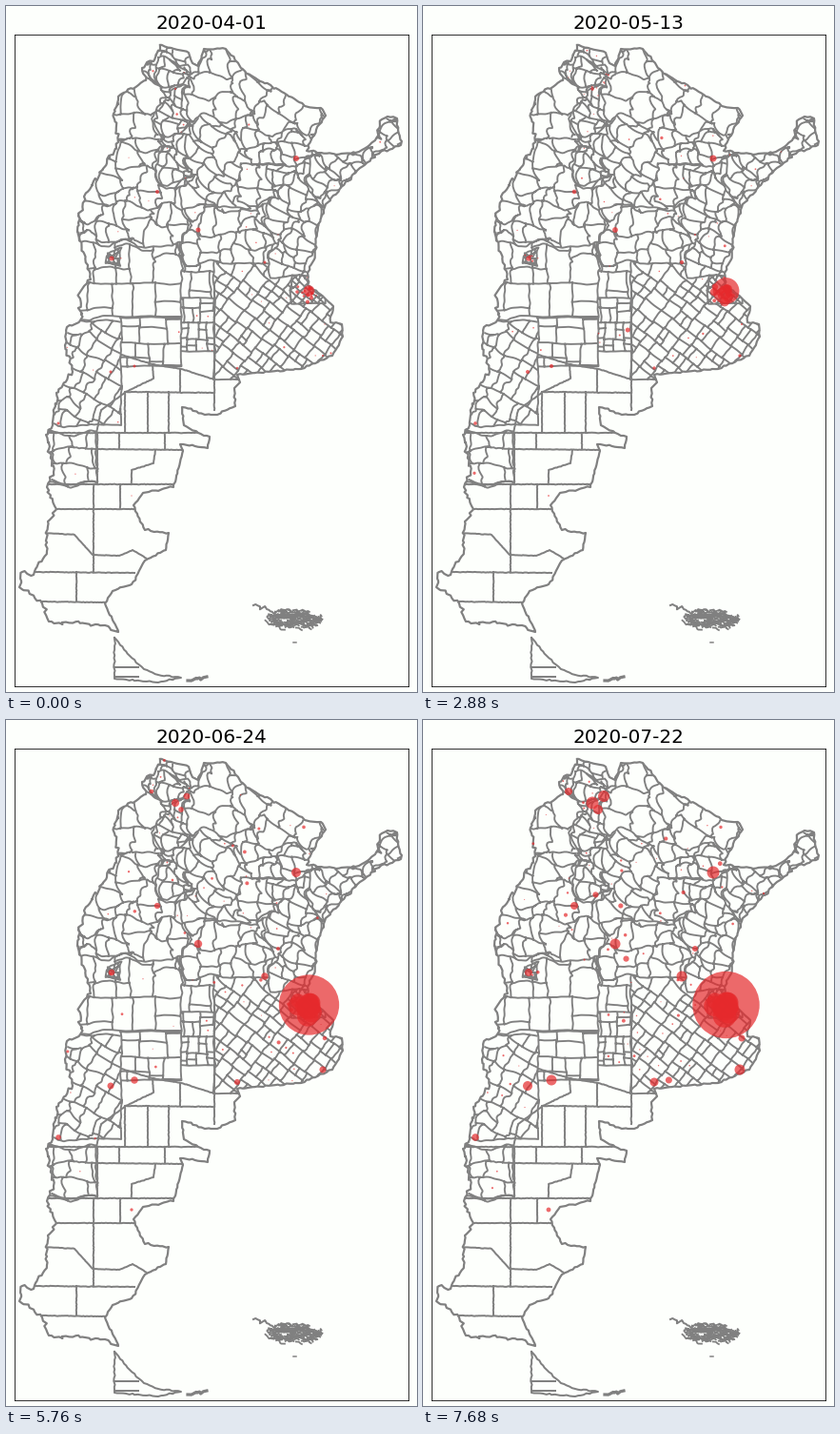
Animation of 432x720 px, one loop 8000 ms. Source, as a matplotlib script:

```python
import numpy as np
import matplotlib.pyplot as plt
from matplotlib.animation import FuncAnimation
from matplotlib.path import Path

W, H, DPI = 432, 720, 72
PAPER, GREY, RED = "#fdfffc", "#808080", "#e6292c"
FRAMES, INTERVAL, FRAMES_PER_WEEK, WEEKS = 50, 160, 3, 17
GAP = [[np.nan, np.nan]]
rng = np.random.default_rng(7)

# Data units are pixels, counted from the top left corner.
fig = plt.figure(figsize=(W / DPI, H / DPI), dpi=DPI, facecolor=PAPER)
ax = fig.add_axes([9 / W, 6 / H, 414 / W, 684 / H], facecolor=PAPER)
ax.set(xlim=(9, 423), ylim=(714, 30), xticks=[], yticks=[])
title = ax.set_title("", fontsize=20, family="DejaVu Sans", pad=6)


def trace(points, jitter=0.0, step=1.5):
    """Subdivide a polyline and shake the added points."""
    points = np.reshape(points, (-1, 2)).astype(float)
    out = []
    for a, b in zip(points[:-1], points[1:]):
        n = max(1, int(np.hypot(*(b - a)) / step))
        part = a + (b - a) * np.arange(n)[:, None] / n
        part[1:] += rng.normal(0, 1, (n - 1, 2)) * jitter
        out.append(part)
    return np.vstack(out + [points[-1:]])


def stroke(points, width=2):
    ax.plot(*points.T, color=GREY, lw=width, solid_joinstyle="round", zorder=2)


def fade(v):
    return 1 / (1 + np.exp(np.clip(v, -50, 50)))


# Districts share one field of waves, so warped lines still meet.
wavelength = np.array([38, 30, 17, 13, 9, 7])
bearing = rng.uniform(0, 2 * np.pi, 6)
wave = 2 * np.pi / wavelength * np.array([np.cos(bearing), np.sin(bearing)])
phase = rng.uniform(0, 2 * np.pi, (6, 2))


def warp(p):
    """Bend lines strongly in the north and west, hardly in the plains."""
    x, y = p.T
    strength = 0.2 + 0.9 * fade((y - 265) / 12) + 0.6 * fade((x - 95) / 8) * fade((300 - y) / 9)
    shift = np.sin((p @ wave)[:, :, None] + phase) * 0.065 * wavelength[:, None]
    return p + shift.sum(1) * strength[:, None]


# Outer border, clockwise from the northern tip.
rivers = [162, 41, 192, 49, 196, 60, 202, 63, 208, 45, 231, 45, 253, 71, 287, 88,
          314, 105, 331, 107, 336, 115, 326, 130, 316, 152, 347, 156, 371, 153,
          388, 141, 395, 119, 401, 116, 411, 118, 415, 146, 392, 155, 372, 170,
          336, 208, 328, 232, 324, 266, 317, 280, 317, 293]
atlantic = [317, 293, 331, 303, 344, 315, 341, 332, 353, 334, 354, 347, 343, 367,
            310, 381, 243, 387, 246, 395, 240, 401, 241, 420, 222, 429, 209, 429,
            185, 421, 187, 440, 208, 451, 214, 452, 212, 464, 183, 460, 186, 467,
            176, 505, 144, 511, 134, 524, 146, 550, 171, 553, 168, 571, 146, 582,
            132, 607, 112, 614, 104, 627, 118, 657]
andes = [118, 657, 104, 650, 45, 646, 38, 627, 14, 610, 17, 594, 29, 597, 43, 572,
         44, 541, 53, 528, 43, 505, 50, 489, 42, 450, 49, 440, 53, 406, 70, 384,
         62, 356, 64, 337, 78, 330, 78, 300, 89, 287, 75, 237, 82, 200, 106, 165,
         118, 143, 113, 113, 118, 95, 147, 78, 143, 65, 155, 58, 162, 41]
border = np.vstack([trace(rivers, 0.7, 3), trace(atlantic, 0.5, 3), trace(andes, 1.1, 3)])
country = Path(border)
stroke(border, 2.2)


def split(box, size, cuts, centres):
    """Halve a box across its longer side until it is about the given size."""
    x0, y0, x1, y1 = box
    if max(x1 - x0, y1 - y0) < size * rng.uniform(1.2, 1.9):
        centres.append(((x0 + x1) / 2, (y0 + y1) / 2))
        return
    t = rng.uniform(0.35, 0.65)
    if x1 - x0 > y1 - y0:
        m = x0 + t * (x1 - x0)
        cuts.append((m, y0, m, y1))
        halves = (x0, y0, m, y1), (m, y0, x1, y1)
    else:
        m = y0 + t * (y1 - y0)
        cuts.append((x0, m, x1, m))
        halves = (x0, y0, x1, m), (x0, m, x1, y1)
    for half in halves:
        split(half, size, cuts, centres)


def within(p, box):
    x0, y0, x1, y1 = box
    return (abs(p[:, 0] - (x0 + x1) / 2) <= (x1 - x0) / 2 + 0.01) & \
           (abs(p[:, 1] - (y0 + y1) / 2) <= (y1 - y0) / 2 + 0.01)


def fill_zone(box, size, angle, taken):
    """Draw the districts of one zone and return their centres."""
    x0, y0, x1, y1 = box
    half = np.hypot(x1 - x0, y1 - y0) / 2
    c, s = np.cos(np.radians(angle)), np.sin(np.radians(angle))
    cuts, centres = [], []
    split((-half, -half, half, half), size, cuts, centres)

    def place(p):
        return np.array(p) @ [[c, s], [-s, c]] + [(x0 + x1) / 2, (y0 + y1) / 2]

    def free(p):
        owned = within(p, box)
        for other in taken:
            owned &= ~within(p, other)
        return owned & country.contains_points(warp(p))

    lines = [place(trace(cut)) for cut in cuts]
    lines.append(trace([x0, y0, x1, y0, x1, y1, x0, y1, x0, y0]))
    parts = []
    for line in lines:
        bent = warp(line)
        bent[~free(line)] = np.nan
        parts += [bent, GAP]
    stroke(np.vstack(parts), 1.9)
    centres = place(centres)
    return warp(centres[free(centres)])


# Left, top, right, bottom, district size, tilt; earlier zones win overlaps.
zones = [
    (300, 284, 336, 312, 6, 40),
    (104, 256, 122, 272, 6, 0),
    (162, 58, 192, 182, 9, 20),
    (138, 38, 205, 78, 14, 10),
    (110, 76, 162, 140, 32, 0),
    (192, 44, 253, 118, 28, 0),
    (253, 132, 322, 166, 11, 0),
    (253, 60, 340, 132, 24, 35),
    (322, 100, 420, 215, 13, 45),
    (278, 166, 345, 284, 13, 20),
    (246, 166, 278, 206, 26, 5),
    (188, 118, 253, 210, 14, 40),
    (188, 206, 278, 270, 16, 0),
    (72, 140, 188, 250, 16, 5),
    (72, 250, 184, 326, 27, 0),
    (184, 250, 219, 306, 19, 0),
    (184, 306, 219, 362, 11, 0),
    (219, 262, 360, 392, 12, 38),
    (121, 327, 184, 378, 22, 0),
    (44, 331, 121, 440, 15, 30),
    (40, 448, 95, 502, 17, 0),
]
sites, taken = [], []
for *box, size, angle in zones:
    sites.append(fill_zone(box, size, angle, taken))
    taken.append(box)
sites = np.vstack(sites)


def clipped(points):
    line = trace(points, 0.15)
    line[~country.contains_points(line)] = np.nan
    stroke(line)


# Southern grid: parallels and meridians.
for y in (448, 502, 528):
    clipped([0, y, W, y])
for x0, y, x1 in [(126, 405, 219), (95, 465, 190), (30, 594, 135), (30, 625, 104)]:
    clipped([x0, y, x1, y + 1])
for x, y0, y1 in [(125, 405, 448), (149, 405, 448), (171, 405, 448), (183, 382, 405),
                  (219, 294, 424), (119, 448, 465), (167, 448, 465), (96, 448, 502),
                  (92, 502, 594), (120, 502, 528), (74, 594, 624)]:
    clipped([x, y0, x, y1])
clipped([121, 366, 154, 376, 184, 381, 219, 392])
clipped([154, 376, 155, 391, 126, 405, 100, 424, 95, 448])
clipped([157, 466, 155, 480, 132, 487, 132, 502])
clipped([40, 553, 72, 555, 91, 576, 119, 577, 133, 571, 150, 581])

# Southern island with its two inner borders.
stroke(trace([114, 663, 114, 706, 160, 710, 184, 705, 160, 702, 145, 696,
              130, 682, 114, 663], 0.4, 3))
for y in (694, 704):
    stroke(trace([114, y, 139, y]))

# Small islands: tangled shorelines that read almost as solid grey.
for _ in range(120):
    t, r = rng.uniform(0, 2 * np.pi), np.sqrt(rng.uniform())
    x, y = 302 + 29 * r * np.cos(t), 644 + 10 * r * np.sin(t)
    stroke(trace([x - 3, y - 1, x + 3, y + rng.normal(0, 2)], 1.1, 2), 1.8)
stroke(trace([260, 629, 274, 633, 282, 638], 0.8, 2))
stroke(trace([191, 708, 201, 706, 211, 704], 0.7, 2), 3.2)
stroke(trace([302, 668, 305, 668]), 1.5)

# Cities that grow: x, y, first and last radius.
CAPITAL = np.array([318.5, 299])
cities = np.array([
    (305, 160, 3.0, 6.5), (159, 195, 2.0, 4.0), (178, 87, 1.0, 6.5), (190, 80, 0, 6.0),
    (184, 94, 0, 5.0), (153, 75, 0, 4.0), (202, 235, 2.5, 5.5), (272, 269, 1.5, 5.5),
    (286, 240, 0.6, 3.0), (111, 265, 2.5, 4.0), (333, 367, 1.0, 5.5),
    (243, 380, 1.2, 4.5), (335, 334, 0.6, 3.5), (135, 378, 1.5, 5.5),
    (110, 384, 1.5, 5.0), (55, 438, 1.5, 3.8), (132, 514, 0.6, 2.4),
])
suburbs = rng.normal(CAPITAL + [-0.5, 2], [5, 4], (18, 2))
suburb_share = rng.uniform(0.07, 0.36, 18)


def week_dots(week):
    """Positions and radii of every dot in one week."""
    local = np.random.default_rng(100 + week)
    t = week / (WEEKS - 1)
    capital = 5 + 31 * fade((8 - week) / 2.2)
    grown = cities[:, 2] + (cities[:, 3] - cities[:, 2]) * t ** 2
    minor = sites[local.choice(len(sites), int(40 + 45 * t), replace=False)]
    small = 0.5 + local.exponential(0.2 + 0.35 * t, len(minor))
    return (np.vstack([CAPITAL, suburbs, cities[:, :2], minor]),
            np.concatenate([[capital], capital * suburb_share, grown, small]))


weeks = [week_dots(w) for w in range(WEEKS)]
dots = ax.scatter([], [], color=RED, alpha=0.7, linewidths=0, zorder=3)


def update(frame):
    week = frame // FRAMES_PER_WEEK
    xy, radii = weeks[week]
    dots.set_offsets(xy)
    dots.set_sizes((2 * radii) ** 2)
    title.set_text(str(np.datetime64("2020-04-01") + 7 * week))
    return dots, title


anim = FuncAnimation(fig, update, frames=FRAMES, interval=INTERVAL,
                     repeat=True, repeat_delay=0, blit=False)
plt.show()
```
